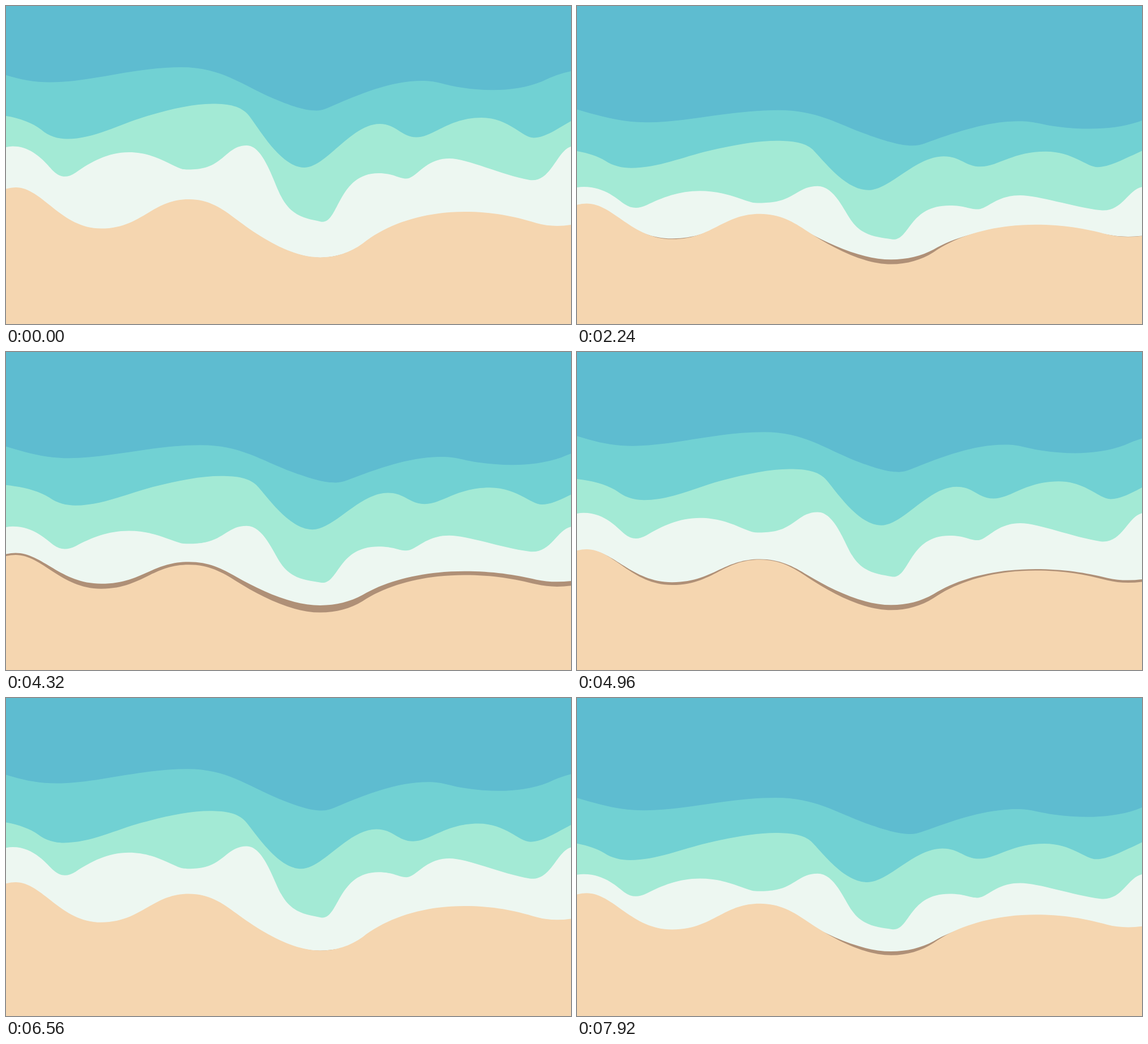
An HTML page for the animation above (8000 ms loop, 998 px wide and 561 px high).

```html
<!DOCTYPE html>
<html lang="en">
<head>
<meta charset="utf-8">
<title>Shore</title>
<style>
  html, body { margin: 0; width: 100%; height: 100%; overflow: hidden; background: #af9077; }
  svg { display: block; width: 100%; height: 100%; }
</style>
</head>
<body>
<svg viewBox="0 0 998 561" preserveAspectRatio="none"></svg>
<script>
const LOOP = 8000, STEP = 80, TIDE = 6000;

const shore = `0,322.5 Q9,320 17,320 C64,320 97,392.5 168,392.5 S258,341 323,341
  C358,341 382,357 407,376.5 C450,409 505,443.5 555,443.5 C583,443.5 608,435 630,419
  C675,383 740,363 810,363 C860,363 898,371 937,383 Q965,391 998,386`;
const foam = `0,249 Q6,247.5 12,247.5 C50,247.5 73,281 84,291.5
  C96,303 108,304 123,294 C150,275 180,258 217,258 C260,258 287,279 309,287
  C315,289.5 338,289 352,285 C385,276 394,246 425,246 C455,246 472,310 486,336
  C505,373 532,375 556,380.5 C588,387 585,295 658,295 C685,295 693,304.5 707,304.5
  C725,304.5 740,269 783,269 C815,269 875,298 925,307 C963,312 972,256 998,248`;
const shallow = `-30,190.5 Q-15,191 0,194 C24,197.5 48,207 62,218
  C76,230 92,234.5 108,234.5 C155,234.5 200,209 245,195.5 C290,182 330,172.5 365,172.5
  C395,172.5 415,177 428,192 C446,214 485,285 527,285 C565,285 610,208 660,208
  C690,208 698,231.5 725,231.5 C755,231.5 782,197 840,197 C888,197 912,232.5 932,232.5
  C952,232.5 975,216 998,203 L1030,183`;
const deep = `-60,101 Q-30,113 0,122 C26,130 50,134.5 78,134.5
  C150,134.5 225,108 310,108 C380,108 416,139 472,163 C510,179 530,184.5 548,184.5
  Q558,184.5 569,179.5 C625,155 680,132 735,132 C763,132 772,139 802,143.5
  Q831,148.3 860,148.3 C890,148.3 920,144 947,133 Q973,120 998,115 L1010,113`;

// One push and pull of the water: up to `height` at time `peak`, back to 0 after a tide.
function swell(time, height, peak, rise, fall = rise) {
  const rising = time < peak;
  const part = rising ? time / peak : (TIDE - time) / (TIDE - peak);
  return height * Math.sin(part * Math.PI / 2) ** (rising ? rise : fall);
}

function sway(time) {
  const angle = time / TIDE * 2 * Math.PI;
  return 2.2 * Math.sin(2 * angle) - 14 * Math.sin(angle);
}

// Each layer is squeezed vertically toward `base`; `rise` is how far its `crest` sinks.
const layers = [
  { edge: shore, fill: '#edf7f1', end: -900, base: 457, crest: 320,
    rise: t => 4 + swell(t, 35, 2960, 0.5) },
  { edge: foam, fill: '#a3ead5', end: -900, base: 483, crest: 246,
    rise: t => swell(t, 82, 3120, 1.3) },
  { edge: shallow, fill: '#71d1d3', end: -900, base: 461, crest: 172.5,
    rise: t => swell(t, 65.5, 1950, 1.08, 0.7), drift: sway },
  { edge: deep, fill: '#5ebcd0', end: -900, base: 525, crest: 108,
    rise: t => swell(t, 82, 2880, 1.3), drift: (t, sink) => sink * 0.605 },
  { edge: shore, fill: '#f5d6b0', end: 900, base: 534, crest: 320,
    rise: t => swell(t, 40, 3900, 1.4, 1) }
];

const svg = document.querySelector('svg');
for (const layer of layers) {
  layer.node = document.createElementNS(svg.namespaceURI, 'path');
  layer.node.setAttribute('d', `M${layer.edge} V${layer.end} H-60 Z`);
  layer.node.setAttribute('fill', layer.fill);
  svg.append(layer.node);
}

function draw(now) {
  const time = Math.floor(now % LOOP / STEP) * STEP % TIDE;
  for (const { node, base, crest, rise, drift } of layers) {
    const sink = rise(time);
    const scale = 1 - sink / (base - crest);
    const x = drift ? drift(time, sink) : 0;
    node.setAttribute('transform', `translate(${x} ${base * (1 - scale)}) scale(1 ${scale})`);
  }
}

const start = performance.now();
function tick() {
  draw(performance.now() - start);
  requestAnimationFrame(tick);
}
tick();
</script>
</body>
</html>
```
